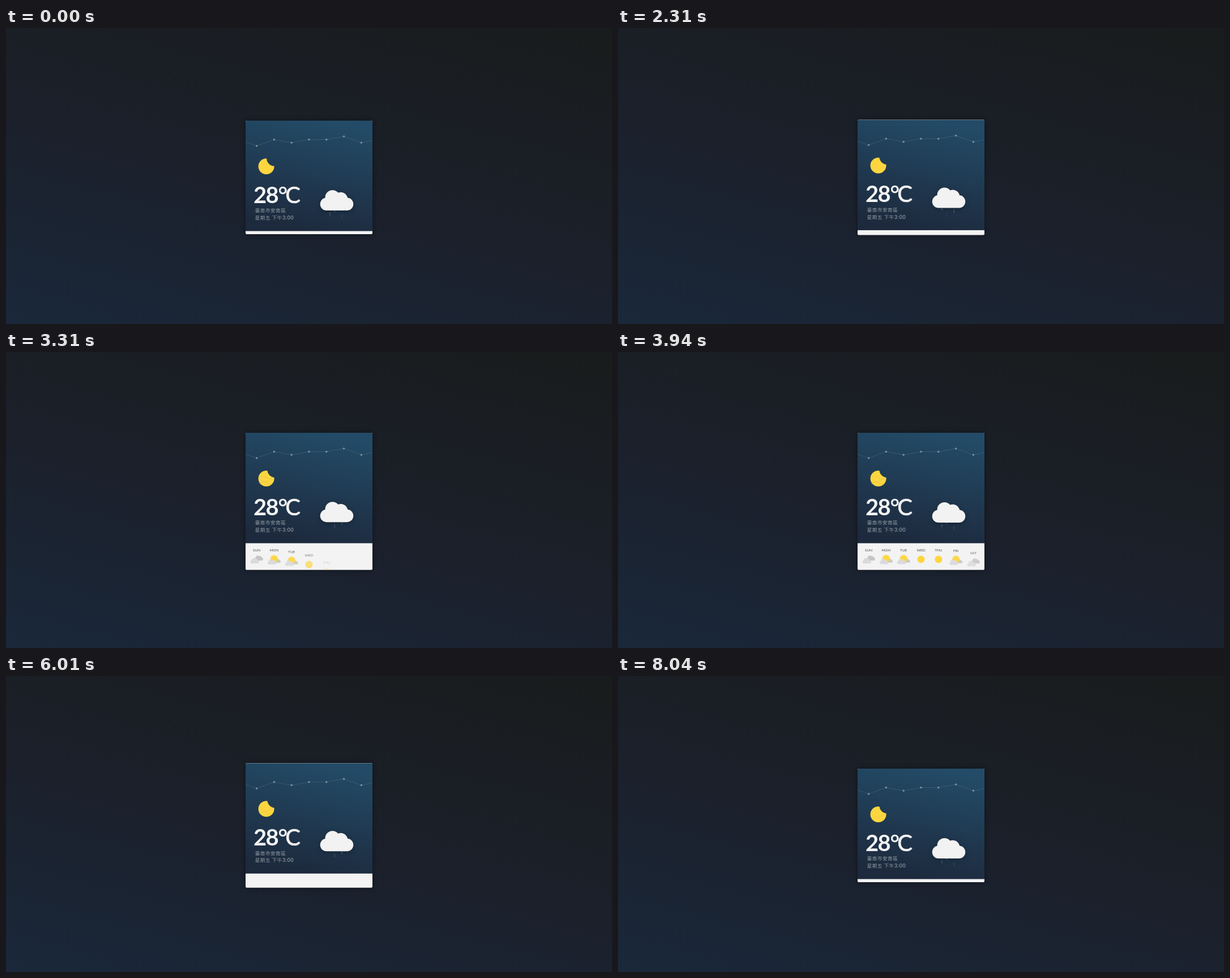
Animation of 1070 by 524 pixels, one loop 8070 ms. Source, as an HTML page:

```html
<!DOCTYPE html>
<html lang="zh-Hant">
<head>
<meta charset="utf-8">
<title>Weather card</title>
<style>
  html, body { margin: 0; width: 100%; height: 100%; overflow: hidden; }
  body { background: linear-gradient(15deg, #1a283a, #1b202b 46%, #191c1c); }
  svg { display: block; width: 100%; height: 100%; }
  text { font-family: Lato, "Noto Sans CJK TC", "Noto Sans CJK", sans-serif; }
  #temperature { font-size: 40px; font-weight: 700; fill: #f3f3f3; }
  #place { font-size: 8.5px; letter-spacing: .6px; fill: #fff; fill-opacity: .52; }
  #place .clock { font-size: 9px; font-weight: 600; }
  #days text { font-size: 6.4px; text-anchor: middle; fill: #4a4a4a; }
  #base { filter: drop-shadow(0 0 5px rgba(0, 0, 0, .4)); }
  #cloud { filter: drop-shadow(0 2px 4px rgba(0, 0, 0, .28)); }
</style>
</head>
<body>
<svg viewBox="0 0 1070 524" xmlns="http://www.w3.org/2000/svg">
  <defs>
    <linearGradient id="sky" x1=".38" y1="1" x2=".62" y2="0">
      <stop offset="0" stop-color="#1d293c"/>
      <stop offset=".2" stop-color="#1e3045"/>
      <stop offset="1" stop-color="#234b67"/>
    </linearGradient>
    <clipPath id="cardClip"><rect class="frame" width="224" rx="2"/></clipPath>
    <mask id="moonMask">
      <rect x="20" y="60" width="36" height="40" fill="#fff"/>
      <circle id="bite" r="13.8"/>
    </mask>
    <g id="cloudShape">
      <rect x="-29.3" y="-22.5" width="58.6" height="22.5" rx="11.25"/>
      <circle cx="-7.5" cy="-23" r="13"/>
      <circle cx="7" cy="-19.8" r="12.4"/>
    </g>
    <g id="sunny"><circle r="6.5" fill="#fdd63f"/></g>
    <g id="cloudy">
      <use href="#cloudShape" transform="translate(4 2.2) scale(.25)" fill="#c5c5c5"/>
      <use href="#cloudShape" transform="translate(-3.2 7.3) scale(.26)" fill="#dadada"/>
    </g>
    <g id="partly">
      <use href="#cloudShape" transform="translate(5.8 5.8) scale(.2)" fill="#c9c9c9"/>
      <circle cy="-1" r="7" fill="none" stroke="#fdd63f" stroke-opacity=".6" stroke-width="1.6" stroke-dasharray="1 1.2"/>
      <circle cy="-1" r="6.2" fill="#fdd63f"/>
      <use href="#cloudShape" transform="translate(-3.6 8.6) scale(.26)" fill="#dadada"/>
    </g>
  </defs>

  <g id="card">
    <rect id="base" class="frame" width="224" rx="2" fill="#f3f3f3"/>
    <g clip-path="url(#cardClip)">
      <g id="days"></g>
      <rect width="224" height="195.5" fill="url(#sky)"/>
    </g>
    <g id="graph"></g>

    <g mask="url(#moonMask)">
      <circle cx="36.6" cy="81" r="14" fill="#fdd63f"/>
      <g fill="none" stroke="#d3b765" stroke-width=".9">
        <path id="ripples" d="M24 79q6-4 12 0t12 2M24 90q8-5 14-1t10-1"/>
        <path id="ripple" d="M26 83q5 4 10 3t12-5"/>
      </g>
    </g>

    <text id="temperature" y="146"><tspan x="14" letter-spacing="-1.7">28</tspan><tspan x="57.5" font-weight="400" stroke="#f3f3f3" stroke-width=".7">°</tspan><tspan x="70.3" font-weight="400" stroke="#f3f3f3" stroke-width=".7">C</tspan></text>
    <g id="place">
      <text x="16.7" y="162.3">臺南市安南區</text>
      <text x="16.7" y="175.2">星期五 下午<tspan class="clock">3:00</tspan></text>
    </g>

    <g id="bob">
      <g id="drops" stroke="#a9bcc8" stroke-width="1.1"></g>
      <use id="cloud" href="#cloudShape" x="161" y="159" fill="#f2f2f2"/>
    </g>
  </g>
</svg>

<script>
const LOOP = 8070, OPEN = 2225, CLOSE = 5700;
const NS = 'http://www.w3.org/2000/svg';
const $ = id => document.getElementById(id);

function add(parent, tag, attrs, text = '') {
  const node = document.createElementNS(NS, tag);
  set(node, attrs);
  node.textContent = text;
  return parent.appendChild(node);
}
function set(node, attrs) {
  for (const key in attrs) node.setAttribute(key, attrs[key]);
}

// CSS "ease": cubic-bezier(.25, .1, .25, 1)
function ease(x) {
  if (x <= 0) return 0;
  if (x >= 1) return 1;
  let lo = 0, hi = 1, u;
  for (let i = 0; i < 24; i++) {
    u = (lo + hi) / 2;
    const bx = .75 * u * (1 - u) + u ** 3;
    if (bx < x) lo = u; else hi = u;
  }
  return .3 * u * (1 - u) ** 2 + 3 * u * u * (1 - u) + u ** 3;
}

const columnX = i => 19.6 + i * 30.8;

const heights = [44.7, 33.5, 39, 33.5, 33.5, 28, 39];
const points = heights.map((y, i) => [columnX(i), y]);
add($('graph'), 'polyline', {
  points: [[0, 38], ...points, [224, 35]].join(' '),
  fill: 'none', stroke: '#fff', 'stroke-opacity': .16, 'stroke-width': .7
});
for (const [cx, cy] of points) add($('graph'), 'circle', { cx, cy, r: 1.7, fill: '#7c929f' });

const forecast = [
  ['SUN', 'cloudy'], ['MON', 'partly'], ['TUE', 'partly'], ['WED', 'sunny'],
  ['THU', 'sunny'], ['FRI', 'partly'], ['SAT', 'cloudy']
];
const days = forecast.map(([name, icon]) => {
  const group = add($('days'), 'g', {});
  add(group, 'text', { y: 14.3 }, name);
  add(group, 'use', { href: '#' + icon, y: 28.5 });
  return group;
});

const drops = [[149, 0], [157.3, -.4], [170.2, .25]].map(([x, lead]) =>
  ({ lead, line: add($('drops'), 'line', { x1: x, x2: x }) }));

function draw(t) {
  const closing = ease((t - CLOSE) / 1000);
  const open = ease((t - OPEN) / 1000) - closing;
  set($('card'), { transform: `translate(423 ${164 - 21 * open})` });
  document.querySelectorAll('.frame').forEach(r => set(r, { height: 201 + 41.7 * open }));

  days.forEach((day, i) => {
    const shown = ease((t - 2466 - 178 * i) / 800) - ease((t - CLOSE) / 800);
    set(day, { transform: `translate(${columnX(i)} ${195.5 + 28 * (1 - shown)})`, opacity: shown });
  });

  const drift = ease(t / 1600);
  set($('bite'), { cx: 51 + 1.3 * drift, cy: 66.8 - 1.3 * drift });
  set($('ripples'), { opacity: .6 * open });
  set($('ripple'), { opacity: .4 * ease((t - OPEN) / 1000) });

  const lift = 1.5 * (1 - Math.cos(4 * Math.PI * t / LOOP));
  set($('bob'), { transform: `translate(0 ${-lift})` });
  for (const { lead, line } of drops) {
    const p = (6 * t / LOOP + 1.57 + lead) % 1;
    const end = 159 + 16.5 * p;
    set(line, { y1: end - 6.5, y2: end, opacity: .5 * (1 - p * p) });
  }
}

const start = performance.now();
(function tick() {
  draw((performance.now() - start) % LOOP);
  requestAnimationFrame(tick);
})();
</script>
</body>
</html>
```
